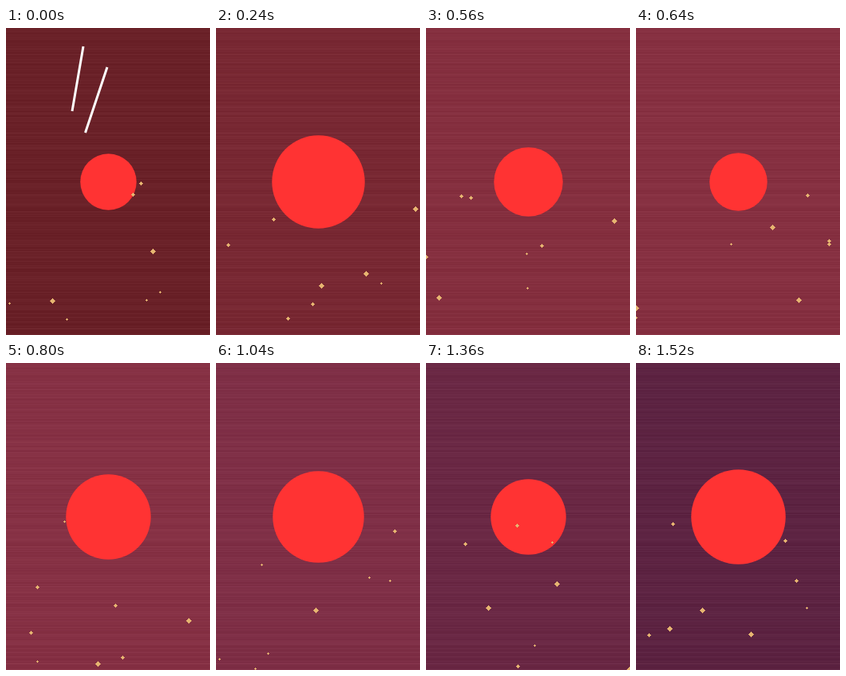
An HTML page with a canvas that plays this animation: 256x384 px, repeating every 1.6 s.

```html
<!DOCTYPE html>
<html lang="en">
<head>
<meta charset="utf-8">
<title>Pulse</title>
<style>
  html, body { margin: 0; width: 100%; height: 100%; overflow: hidden; background: #6c242a; }
  canvas { display: block; width: 256px; height: 384px; }
</style>
</head>
<body>
<canvas id="stage" width="256" height="384"></canvas>
<script>
const W = 256, H = 384, STEP = 80, STEPS = 20;
const ctx = document.getElementById('stage').getContext('2d');

function seeded(seed) {
  return () => {
    seed = (seed + 0x6D2B79F5) | 0;
    let t = Math.imul(seed ^ (seed >>> 15), 1 | seed);
    t = (t + Math.imul(t ^ (t >>> 7), 61 | t)) ^ t;
    return ((t ^ (t >>> 14)) >>> 0) / 4294967296;
  };
}

// Brightness offset of every row: fine scan lines plus irregular streaks
const rowRandom = seeded(11);
const rows = Array.from({ length: H }, (_, y) => (y % 2 ? 3 : -3) + (rowRandom() - 0.5) * 10);

function drawBackground(step) {
  const p = step / STEPS, glow = Math.sin(Math.PI * p);
  const base = [106 - 20 * p + 38 * glow, 33 + 16 * glow, 40 + 25 * p + 16 * glow];
  rows.forEach((offset, y) => {
    ctx.fillStyle = `rgb(${base.map(c => Math.round(c + offset))})`;
    ctx.fillRect(0, y, W, 1);
  });
}

function drawDisc(step) {
  const radius = Math.floor(35 + 25 * Math.abs(Math.sin(step * 0.4)));
  ctx.fillStyle = '#ff3333';
  ctx.beginPath();
  ctx.arc(W / 2 + 0.5, H / 2 + 0.5, radius + 0.25, 0, 2 * Math.PI);
  ctx.fill();
}

function drawFlash() {
  ctx.strokeStyle = '#fff';
  ctx.lineWidth = 3;
  ctx.beginPath();
  ctx.moveTo(97, 23);
  ctx.lineTo(83, 104);
  ctx.moveTo(127, 49);
  ctx.lineTo(99.5, 131);
  ctx.stroke();
}

function drawSparks(step) {
  const random = seeded(step * 97 + 5);
  ctx.fillStyle = '#e6b470';
  for (let i = 0; i < 8; i++) {
    const x = Math.floor(random() * W);
    const y = Math.floor(H / 2 + random() * H / 2);
    const size = 1 + Math.floor(random() * 3);
    for (let d = -size; d <= size; d++) {
      const half = size - Math.abs(d);
      ctx.fillRect(x - half, y + d, 2 * half + 1, 1);
    }
  }
}

function draw(step) {
  drawBackground(step);
  drawDisc(step);
  if (step === 0) drawFlash();
  drawSparks(step);
}

const start = performance.now();
function tick() {
  draw(Math.floor((performance.now() - start) / STEP) % STEPS);
  requestAnimationFrame(tick);
}
tick();
</script>
</body>
</html>
```
